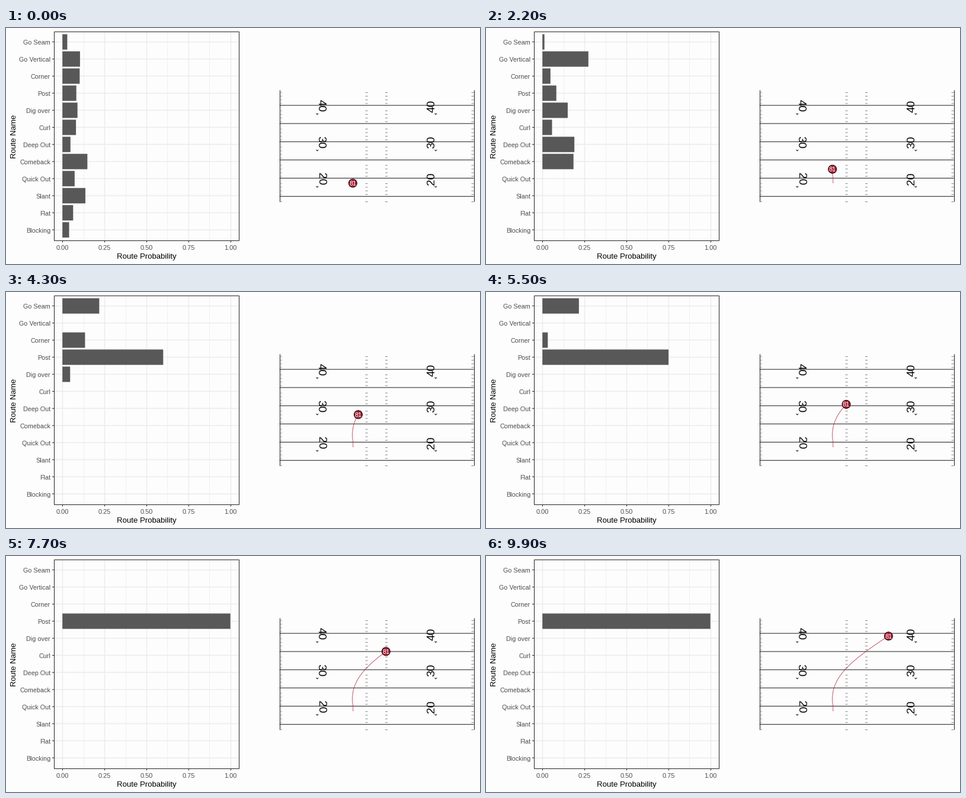
Recreate the animation shown at these times as a matplotlib script. Size 800 by 400 pixels, loop 10000 ms.

```python
import matplotlib.pyplot as plt
import numpy as np
from matplotlib.animation import FuncAnimation
from matplotlib.patches import Circle, Rectangle
from numpy.polynomial import Polynomial

W, H, DPI = 800, 400, 100
FRAMES, STEP = 100, 100
PX = 72 / DPI  # points per pixel

plt.rcParams["font.family"] = "Liberation Sans"
BG, BAR, GRID, EDGE = "#fefdfe", "#595859", "#ebebec", "#333333"
LABEL, RED, INK = "#4d4d4d", "#a71930", "#1a1a1a"

# name: share at the snap, then peak, centre and half width (s) of its bump
ROUTES = {
    "Go Seam": (.029, .237, 4.85, 3.1),
    "Go Vertical": (.105, .274, 2.2, 1.7),
    "Corner": (.103, .152, 3.75, 2.5),
    "Post": (.083,),
    "Dig over": (.09, .257, 3, 1.8),
    "Curl": (.081, .06, 2, 1.5),
    "Deep Out": (.048, .219, 2.6, 1.7),
    "Comeback": (.149, .208, 1.9, 1.4),
    "Quick Out": (.073,),
    "Slant": (.137,),
    "Flat": (.064,),
    "Blocking": (.04,),
}


def smooth(u):
    u = np.clip(u, 0, 1)
    return u * u * (3 - 2 * u)


def weight(t, name, start, peak=0, centre=0, half=1):
    """Unscaled likelihood of a route at t seconds."""
    if name == "Post":
        return start + .65 * smooth((t - 2.6) / 2.4)
    bump = np.cos(np.pi / 2 * np.clip((t - centre) / half, -1, 1)) ** 2
    fade = np.clip(1 - t / 2.2, 0, 1)
    settle = np.clip((6.6 - t) / 1.1, 0, 1)
    return (start * fade + peak * bump) * settle


sec = np.arange(FRAMES) * STEP / 1000
probs = np.array([weight(sec, name, *p) for name, p in ROUTES.items()])
probs /= probs.sum(axis=0)

# Receiver: smooth curve through a few timed points
KEYS = [0, 2.2, 4.3, 5.5, 7.7, 9.9]
path_x = Polynomial.fit(KEYS, [585.3, 584.7, 594.5, 608, 641.3, 679.3], 5)(sec)
path_y = Polynomial.fit(KEYS, [263, 239.3, 207.8, 190.4, 161.8, 135.8], 5)(sec)

fig = plt.figure(figsize=(W / DPI, H / DPI), dpi=DPI, facecolor=BG)
ax = fig.add_axes([0, 0, 1, 1])
ax.set(xlim=(0, W), ylim=(H, 0))
ax.axis("off")


def line(x, y, color, width, z=1, snap=None):
    return ax.plot(x, y, color=color, lw=width * PX, zorder=z, snap=snap,
                   solid_capstyle="butt")[0]


def text(x, y, s, size, color, ha="center", rot=0, z=4):
    return ax.text(x, y, s, fontsize=size * PX, color=color, ha=ha,
                   va="baseline", rotation=rot, rotation_mode="anchor",
                   zorder=z)


# Bar chart
LEFT, RIGHT, TOP, BOTTOM = 81, 393.3, 5.9, 360
X0, XS = 95.2, 283.5
Y0, YS = 23.6, 28.96

for k in range(9):
    x = X0 + XS * k / 8
    major = k % 2 == 0
    line([x, x], [TOP, BOTTOM], GRID, 1.4 if major else .7)
    if major:
        line([x, x], [BOTTOM, BOTTOM + 3], EDGE, 1.1)
        text(x, 375.6, f"{k / 8:.2f}", 11, LABEL)

bars = []
for k, name in enumerate(ROUTES):
    y = Y0 + YS * k
    line([LEFT, RIGHT], [y, y], GRID, 1.4, snap=False)
    line([LEFT - 3, LEFT], [y, y], EDGE, 1.1, snap=False)
    text(75, y + 4.6, name, 10.8, LABEL, ha="right")
    bars.append(ax.add_patch(Rectangle((X0, y - .45 * YS), 0, .9 * YS, fc=BAR,
                                       lw=0, zorder=2, snap=False)))

ax.add_patch(Rectangle((LEFT, TOP), RIGHT - LEFT, BOTTOM - TOP, fill=False,
                       ec=EDGE, lw=1.1 * PX, zorder=3))
text(237, 391, "Route Probability", 13.2, "black")
text(17.3, 183.5, "Route Name", 13.2, "black", rot=90)

# Field
FL, FR, YARD = 461.5, 789.5, 6.17


def yard_y(yard):
    return 131.1 + (40 - yard) * YARD


for x in (FL, FR):
    line([x, x], [105.2, 294.2], INK, 1)
for yard in range(14, 45):
    y = yard_y(yard)
    if yard % 5 == 0:
        line([FL, FR], [y, y], INK, 1, snap=False)
        continue
    for x in (FL, 606.5, 640, FR - 4):
        line([x, x + 4], [y + 3, y + 3], "#858585", 1, snap=False)

for yard in (20, 30, 40):
    y = yard_y(yard) + .9
    text(526.6, y, yard, 19, "black", rot=270, z=2)
    text(723.4, y, yard, 19, "black", rot=90, z=2)
    for x in (525.3, 725.3):
        line([x - 1.8, x, x + 1.8], [y + 12.7, y + 14.6, y + 12.7], INK, 1.1)

# Receiver
trail = line([], [], RED, .7, z=5)
ball = ax.add_patch(Circle((0, 0), 7, fc=RED, ec="black", lw=.9 * PX,
                           zorder=6))
number = text(0, 0, "81", 10.8, "white", z=7)


def update(i):
    for bar, p in zip(bars, probs[:, i]):
        bar.set_width(XS * p)
    x, y = path_x[i], path_y[i]
    trail.set_data(path_x[:i + 1], path_y[:i + 1])
    ball.center = x, y
    number.set_position((x, y + 3.9))
    return [*bars, trail, ball, number]


anim = FuncAnimation(fig, update, frames=FRAMES, interval=STEP, repeat=True,
                     repeat_delay=0)
plt.show()
```
